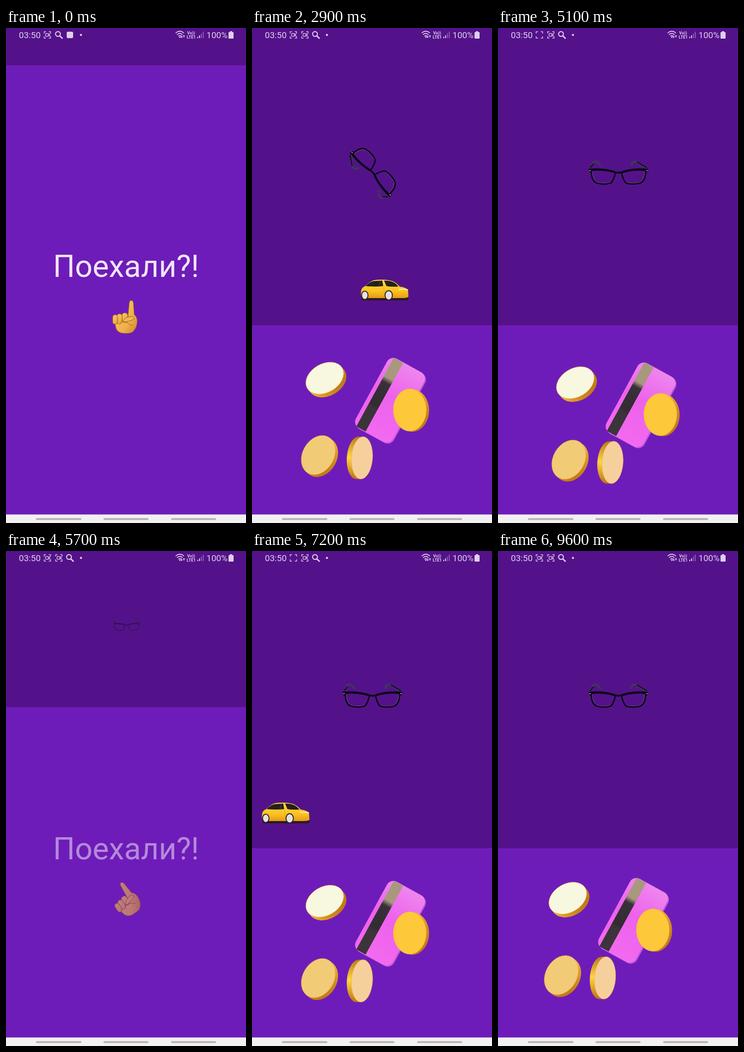
Recreate the animation shown at these times as an HTML page. Size 522 px wide and 1074 px high, loop 9.7 s.

```html
<!DOCTYPE html>
<html lang="ru">
<head>
<meta charset="utf-8">
<title>Поехали</title>
<style>
  html, body { margin: 0; width: 100%; height: 100%; overflow: hidden; background: #6e1cb9; }
  svg { display: block; width: 100%; height: 100%; }
  text { font-family: Roboto, sans-serif; }
</style>
</head>
<body>
<svg viewBox="0 0 522 1074">
  <defs>
    <linearGradient id="skin" x1="0" y1="0" x2="1" y2="1">
      <stop offset="0" stop-color="#f8c964"/><stop offset=".65" stop-color="#eeb04a"/><stop offset="1" stop-color="#c9822b"/>
    </linearGradient>
    <linearGradient id="rim" x1="0" y1="0" x2="1" y2="1">
      <stop offset="0" stop-color="#ffd95c"/><stop offset=".5" stop-color="#e2a02c"/><stop offset="1" stop-color="#b56a10"/>
    </linearGradient>
    <linearGradient id="rimSide" x1="0" y1="0" x2="0" y2="1">
      <stop offset="0" stop-color="#b9781a"/><stop offset=".5" stop-color="#ffd63f"/><stop offset="1" stop-color="#bd7411"/>
    </linearGradient>
    <linearGradient id="pink" x1="0" y1="0" x2="0" y2="1">
      <stop offset="0" stop-color="#ee86ee"/><stop offset=".45" stop-color="#ed62ec"/><stop offset="1" stop-color="#f26af0"/>
    </linearGradient>
    <linearGradient id="stripe" x1="0" y1="0" x2="0" y2="1">
      <stop offset=".26" stop-color="#a8987e"/><stop offset=".33" stop-color="#38303a"/>
      <stop offset=".64" stop-color="#322c32"/><stop offset=".7" stop-color="#3b343b"/>
    </linearGradient>
    <linearGradient id="paint" x1="0" y1="0" x2="0" y2="1">
      <stop offset="0" stop-color="#ffd84a"/><stop offset=".6" stop-color="#fcc322"/><stop offset="1" stop-color="#e59a17"/>
    </linearGradient>
    <path id="brackets" d="M-7-3v-4h4M3-7h4v4M7 3v4h-4M-3 7h-4v-4" fill="none" stroke="#d6c5e5" stroke-width="1.5"/>
    <g id="camera" fill="none" stroke="#d6c5e5" stroke-width="1.4">
      <rect x="-4" y="-3" width="6" height="6" rx="1"/><path d="M2-1l3-1.5v5l-3-1.5"/>
    </g>
    <g id="search" fill="none" stroke="#ddcfe9">
      <circle cx="-2" cy="-2" r="5.2" stroke-width="2.2"/><path d="M2 2l6 6" stroke-width="3"/>
    </g>
  </defs>

  <rect width="522" height="1074" fill="#6e1cb9"/>
  <rect id="panel" width="522" fill="#54128a"/>

  <g id="glasses">
    <g fill="none" stroke="#3c3b52" stroke-linejoin="round">
      <path d="M-62-9L-55-22Q-51-26-45-22L-38-14" stroke-width="3.5"/>
      <path d="M62-8L40-22Q35-26 31-22L27-15" stroke-width="4"/>
    </g>
    <path d="M-62-10L-54-19M62-10L40-23" stroke="#12101c" stroke-width="2.5"/>
    <g fill="none" stroke="#0b0914" stroke-width="3" stroke-linejoin="round">
      <path id="lens" d="M-60-6Q-34-9-9-2Q-6 0-8 6Q-12 20-17 23Q-30 27-47 23Q-55 20-58 9Z"/>
      <use href="#lens" transform="scale(-1 1)"/>
    </g>
    <path d="M-65-8Q-38-11-12-4Q0 1 12-4Q38-11 65-8L64-2L60 1L59-3Q34-6 10 1Q0 4-10 1Q-34-6-59-3L-60 1L-64-2Z" fill="#0b0914"/>
    <g fill="none" stroke="#625e70" stroke-width=".8">
      <path id="glint" d="M-57-2Q-55 16-47 21Q-30 25-18 21"/>
      <use href="#glint" transform="scale(-1 1)"/>
      <path d="M-64-4h4M60-4h4" stroke="#aaa6b5" stroke-width="1.5"/>
    </g>
  </g>

  <g id="car">
    <path d="M-50 14H52V20Q51 22 48 22H-48Q-50 22-50 18Z" fill="#291a25"/>
    <path d="M-51 1Q-50-6-42-9Q-31-20-22-22Q0-25 17-20Q26-16 33-8Q48-6 51 0L52 14Q50 17 40 17H-45Q-53 17-51 1Z" fill="url(#paint)"/>
    <path d="M-41-9Q-32-19-22-20L-5-21L-3-9Q-20-7-41-9ZM-1-21Q12-21 18-18Q25-15 30-8Q14-7 4-9Z" fill="#25201b"/>
    <path d="M-9-21L-12-9" stroke="#5b4a1c" stroke-width="1"/>
    <path d="M31-2Q42-3 51-1" fill="none" stroke="#fff3c0" stroke-width="2"/>
    <path d="M-2-7L0 14M-34 14H0" fill="none" stroke="#d59a1b" stroke-width=".8"/>
    <g fill="#e6e2dd" stroke="#2c2027" stroke-width="2">
      <ellipse cx="-43" cy="11" rx="7" ry="9"/><ellipse cx="9" cy="11" rx="8" ry="10"/>
    </g>
  </g>

  <g id="money">
    <g transform="translate(39 -43) rotate(28.7)">
      <rect x="-43" y="-85" width="92" height="172" rx="16" fill="#c056d6"/>
      <rect x="-46" y="-86" width="92" height="172" rx="16" fill="url(#pink)"/>
      <rect x="-37" y="-85" width="23" height="170" fill="url(#stripe)"/>
    </g>
  </g>

  <text id="title" x="261" text-anchor="middle" font-size="67" fill="#f0e6f7">Поехали?!</text>

  <g id="hand" stroke="#91591f" stroke-width="1" stroke-linejoin="round">
    <path d="M4 2L7-31Q8-36 11-36Q15-36 16-31L18-5Q26 1 24 14Q23 25 14 33Q7 37-9 35Q-19 33-22 24L-24 14Z" fill="url(#skin)"/>
    <rect x="-9" y="-9" width="13" height="21" rx="6" fill="url(#skin)"/>
    <rect x="-20" y="-7" width="12" height="22" rx="6" fill="url(#skin)"/>
    <rect x="-29" y="-5" width="11" height="21" rx="5.5" fill="url(#skin)"/>
    <path d="M-7 10Q-4 1 9-1Q18-3 18 4Q13 8 6 9Q-1 12-7 10Z" fill="#f0b850"/>
    <path d="M2 10Q5 17 14 18" fill="none"/>
  </g>

  <g fill="#ddcfe9">
    <text x="28" y="22" font-size="19">03:50</text>
    <use href="#brackets" x="90" y="15"/>
    <use id="blink" href="#camera" x="90" y="15"/>
    <g id="iconsBefore">
      <use href="#search" x="115" y="15"/>
      <rect x="132" y="8" width="14" height="14" rx="3"/>
    </g>
    <g id="iconsAfter">
      <use href="#brackets" x="115" y="15"/><use href="#camera" x="115" y="15"/>
      <use href="#search" x="139" y="15"/>
    </g>
    <circle cx="163" cy="15" r="2.3"/>
    <g fill="none" stroke="#ddcfe9" stroke-width="1.7">
      <path d="M369 11Q378 3 387 11M372 14.500Q378 9 384 14.500M375 18Q378 15 381 18"/>
      <path d="M382 16v5m-2-2l2 2 2-2M387 21v-5m-2 2l2-2 2 2" stroke-width="1.2"/>
    </g>
    <circle cx="378" cy="20" r="1.5"/>
    <g font-size="9" font-weight="700"><text x="394" y="14">Vo))</text><text x="393" y="23">LTE1</text></g>
    <path d="M416 19h2v3h-2zM420 16h2v6h-2z"/>
    <path d="M424 12h2v10h-2zM428 8h2v14h-2z" opacity=".4"/>
    <text x="436" y="22" font-size="19">100%</text>
    <path d="M487 7h5v2h2q1 0 1 1v12q0 1-1 1h-9q-1 0-1-1v-12q0-1 1-1h2z"/>
  </g>

  <rect y="1055.500" width="522" height="19" fill="#f3f0f2"/>
  <path d="M67 1065.500h95M214 1065.500h94M361 1065.500h94" stroke="#b6b1b5" stroke-width="4" stroke-linecap="round"/>
</svg>
<script>
const LOOP = 9700;
const el = id => document.getElementById(id);
const [panel, glasses, car, money, title, hand, blink, iconsBefore, iconsAfter] =
  ['panel', 'glasses', 'car', 'money', 'title', 'hand', 'blink', 'iconsBefore', 'iconsAfter'].map(el);

// Each coin: face centre, radii, tilt, rim offset, colours.
function addCoin(x, y, rx, ry, tilt, dx, dy, face, rim = 'rim') {
  const disc = (cx, cy, fill, extra = '') =>
    `<ellipse rx="${rx}" ry="${ry}" fill="${fill}" ${extra} transform="translate(${cx} ${cy}) rotate(${tilt})"/>`;
  let html = '';
  for (let k = 4; k > 0; k--) html += disc(x + dx * k / 4, y + dy * k / 4, `url(#${rim})`);
  money.insertAdjacentHTML('beforeend', html + disc(x, y, face, 'stroke="#e9b04a" stroke-width=".8"'));
}
addCoin(-103, -91, 44, 31, -30, 6, 7, '#f8f8e0');
addCoin(-117, 76, 34, 45, 30, 6, 5, '#f2cb76');
addCoin(-22, 82, 23, 46, 4, -10, 0, '#f6d09c', 'rimSide');
addCoin(82, -22, 36, 46, 0, 6, 1, '#fdc83a');

const ease = (t, start, length) => {
  const k = Math.min(1, Math.max(0, (t - start) / length));
  return (1 - Math.cos(Math.PI * k)) / 2;
};

function place(node, x, y, scale, angle, opacity) {
  node.setAttribute('transform', `translate(${x} ${y}) rotate(${angle}) scale(${scale})`);
  node.setAttribute('opacity', opacity);
}
const show = (node, on) => node.setAttribute('visibility', on ? 'visible' : 'hidden');

function draw(t) {
  const open = ease(t, 930, 1000) - ease(t, 5200, 950) + ease(t, 6250, 870);
  const drive = t < 5200 ? ease(t, 2140, 2000) : t < 6200 ? 1 : ease(t, 7245, 2000);
  const edge = 81 + 564 * open;
  const middle = (edge + 1056) / 2;

  panel.setAttribute('height', edge);
  place(glasses, 262, edge / 2 - 9, open, 720 * drive, open);
  place(car, 20 + 53 * open + 680 * drive, 1 + 568 * open, open, 0, open);

  const grow = Math.max(0, 2 * open - 1);
  const sway = (1.9 + 8.2 * Math.cos(2 * Math.PI * (t - 5050) / 3000)) * grow;
  place(money, 261 + sway, middle + sway, grow, 0, Math.min(1, 1.4 * grow));

  title.setAttribute('y', middle - 28.500);
  title.setAttribute('opacity', 1 - open);
  place(hand, 261, middle + 58.500, 1, -75 * open, open > .999 ? 0 : Math.min(1 - .85 * open, 4 * (1 - open)));

  const late = t >= 500;
  const phase = t % 1000;
  show(iconsBefore, !late);
  show(iconsAfter, late);
  show(blink, !late || phase < 100 || phase >= 550);
}

const began = performance.now();
function tick() {
  draw((performance.now() - began) % LOOP);
  requestAnimationFrame(tick);
}
tick();
</script>
</body>
</html>
```
